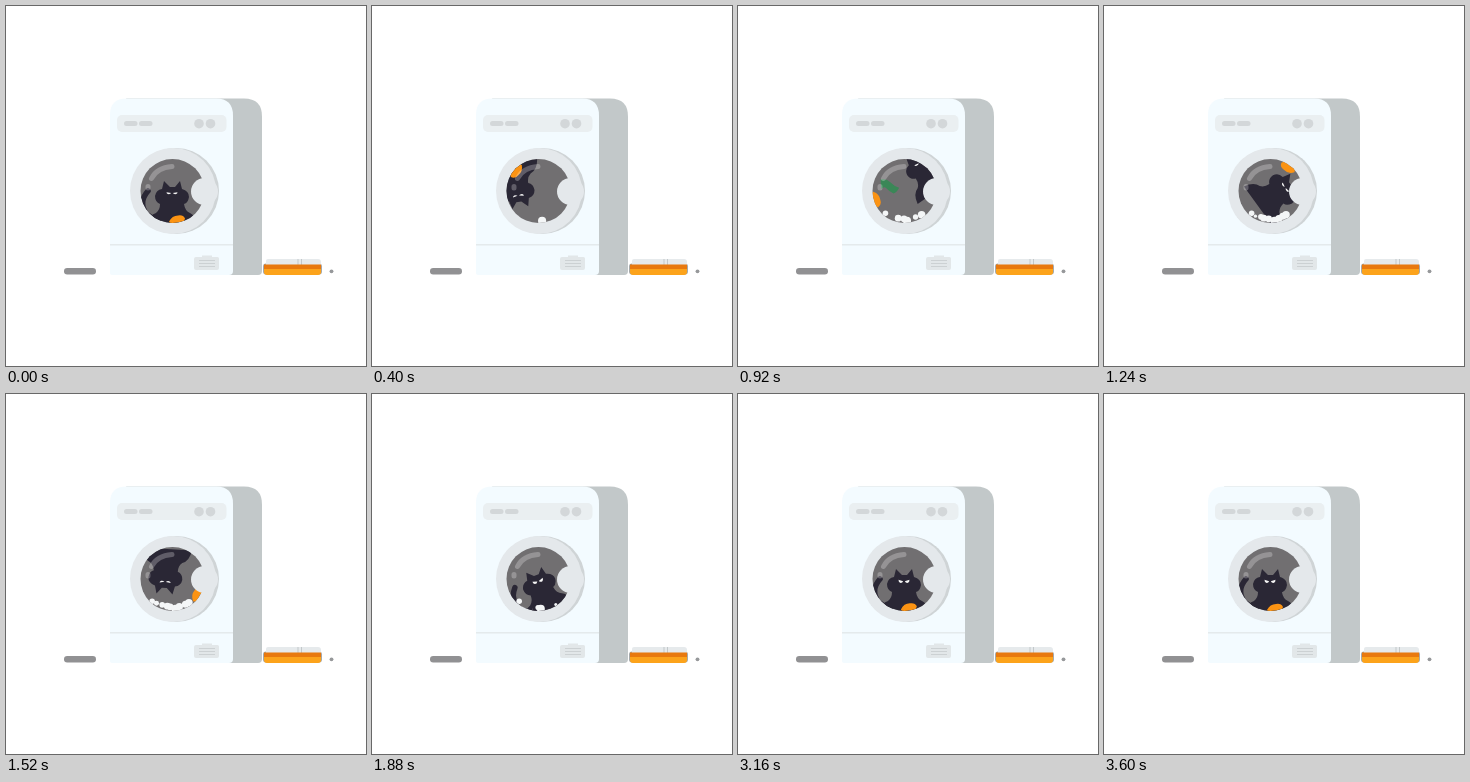
Write an HTML page that moves like this. It is 360 px wide and 360 px high and loops after 3720 ms.

```html
<!DOCTYPE html>
<html lang="en">
<head>
<meta charset="utf-8">
<title>Cat in the washer</title>
<style>
  html, body { margin: 0; width: 100%; height: 100%; overflow: hidden; background: #fff; }
  svg { display: block; width: 100vw; height: 100vh; }
</style>
</head>
<body>
<svg viewBox="0 0 360 360">
  <defs>
    <clipPath id="glass"><circle cx="166.5" cy="185" r="32"/></clipPath>
  </defs>

  <!-- floor items -->
  <rect x="58" y="262" width="32" height="6.5" rx="3.2" fill="#919193"/>
  <circle cx="325.5" cy="265.3" r="1.9" fill="#96989a"/>
  <rect x="257" y="257.5" width="59" height="11" rx="3" fill="#a5a9ab"/>
  <path d="M260 259V255q0-2 2-2H312q3 0 3 3v3z" fill="#e6eaec"/>
  <path d="M292 253v6M295.5 253v6" stroke="#c3c8ca"/>
  <path d="M258 258.5H315V264H258z" fill="#e8790f"/>
  <path d="M258 263H315V266q0 3-3 3H261q-3 0-3-3z" fill="#fca31b"/>

  <!-- cabinet -->
  <path d="M120 92.5H238q18 0 18 18V265q0 4-4 4H215z" fill="#c2c8c9"/>
  <path d="M104 109q0-16.500 16.500-16.500H210q17 0 17 17V265q0 4-4 4H106q-2 0-2-2z" fill="#f3fbff"/>
  <rect x="111" y="109" width="109.5" height="17" rx="5" fill="#eaeff1"/>
  <g fill="#d3d7d9">
    <rect x="118" y="115" width="13.5" height="5" rx="2.5"/>
    <rect x="133" y="115" width="13.5" height="5" rx="2.5"/>
    <circle cx="193" cy="117.7" r="4.8"/>
    <circle cx="204.5" cy="117.7" r="4.8"/>
  </g>
  <path d="M104 238.8H227" stroke="#e4eaec" stroke-width="1.5"/>
  <path d="M196 249.5h10v1.500h5.500q1.500 0 1.500 1.500V262q0 2-2 2H190q-2 0-2-2V253q0-2 2-2h6z" fill="#e2e7e9"/>
  <path d="M193 254.5h16M193 257.5h16M193 260.5h16" stroke="#ccd1d3"/>

  <!-- door -->
  <circle cx="170" cy="185" r="43" fill="#cfd4d6"/>
  <circle cx="167" cy="185" r="43" fill="#e4e8eb"/>
  <g clip-path="url(#glass)">
    <rect x="134" y="152" width="66" height="66" fill="#716f71"/>
    <path id="green" d="M-10-5q5-3 10 0t10 3q-1 5-4 7-5-1-8-3t-5 2z" fill="#3a8757"/>
    <g id="cat">
      <path id="tail" d="M0 0C-17-4-19-19-10-29" fill="none" stroke="#2a2735" stroke-width="5.5" stroke-linecap="round"/>
      <path d="M-10-4L-8-12-2-6H3L8-12 10-4Q17-2 17 4 16 10 12 11 13 18 18 20 24 23 25 33H-25Q-23 22-16 20-12 17-12 11-17 9-17 3-16-3-10-4z" fill="#2a2735"/>
      <g id="eyes" fill="#f5f5f5">
        <path d="M-5.500-1.300L-.8.2Q-2 2.500-4 1.800-5.500 1-5.500-1.300z"/>
        <path d="M5.500-1.300L.8.2Q2 2.500 4 1.800 5.500 1 5.500-1.300z"/>
      </g>
    </g>
    <path id="orange" d="M-8 2q3-6 9-6 5-1 7 3l-2 5q-5-2-8 0-4 2-6-2z" fill="#fb9313"/>
    <g id="suds" fill="#f4f6f7"></g>
    <path d="M145.500 172.500Q151 161.500 166 160.500M142 180.500v1.500" fill="none" stroke="#fff" stroke-opacity=".25" stroke-width="5" stroke-linecap="round"/>
  </g>
  <circle cx="198.5" cy="185.5" r="13.5" fill="#e4e8eb"/>
</svg>
<script>
const LOOP = 3720, TICK = 40, LAST = 3600;
const CX = 166, CY = 185, SUDS = 9;
const $ = id => document.getElementById(id);
const sin = deg => Math.sin(deg * Math.PI / 180);
const cos = deg => Math.cos(deg * Math.PI / 180);
const mix = (a, b, p) => a + (b - a) * p;

// 0 to 1 between two times
const ramp = (t, from, to) => Math.max(0, Math.min(1, (t - from) / (to - from)));
const ease = p => p * p * (3 - 2 * p);

function place(id, x, y, r) {
  $(id).setAttribute('transform', `translate(${x} ${y}) rotate(${r})`);
}

const sway = t => sin(t / 4);

// Two turns that linger when the cat is upright or upside down
function moveCat(t) {
  const calm = ease(ramp(t, 1520, 1860)), s = sway(t) * (1 - calm);
  const turn = .355 * t + 20 * sway(t);
  const angle = t < 2000 ? Math.min(720, turn - 14 * sin(2 * turn)) : 720;
  const toss = 28 * Math.exp(-(((t - 920) / 220) ** 2));
  place('cat', CX - 20 * s, 187 + 3 * s - toss, angle);
  const tail = 1 - ramp(t, 40, 200) + ramp(t, 1700, 1860);
  $('tail').setAttribute('transform', `translate(-14 27) scale(${tail})`);
  $('eyes').setAttribute('transform', `scale(1 ${t < 1700 ? .6 : 1})`);
}

// Round the drum and out of sight, then onto the cat's head and off again
function moveOrange(t) {
  if (t < 2200) {
    const a = .45 * t - 38 * sway(t) - 10;
    const sink = 14 * ramp(t, 1640, 1760);
    const turn = t < 1700 ? a : 721;
    place('orange', CX - 29 * sin(turn), CY + 29 * cos(turn) + sink, turn + 10);
  } else {
    const drop = ramp(t, 2240, 2480) ** 2, slide = ease(ramp(t, 2700, 3200));
    place('orange', mix(164, 171, slide), mix(140, 180, drop) + 34 * slide, mix(-35, 0, slide));
  }
}

function moveGreen(t) {
  const p = (t - 700) / 440;
  place('green', 136 + 30 * p, 165 + 64 * p * p, 60 * p - 15);
}

let seed = 7;
const random = () => (seed = seed * 16807 % 2147483647) / 2147483647;

// Bubbles lie along the bottom of the glass and appear in a mixed order
const bubbles = Array.from({ length: SUDS }, (_, i) => {
  const x = 147 + (5 + 4 * i) % SUDS * 4.5;
  const dot = document.createElementNS('http://www.w3.org/2000/svg', 'circle');
  $('suds').appendChild(dot);
  return {
    dot, x,
    y: CY + Math.sqrt(900 - (x - CX) ** 2) - 3 * random(),
    r: 2.4 + 1.8 * random(),
    start: 280 + 110 * i,
    end: 2050 - 40 * i
  };
});

function moveSuds(t) {
  bubbles.forEach(({ dot, x, y, r, start, end }, i) => {
    const grow = ramp(t, start, start + 120) * (1 - ramp(t, end - 120, end));
    dot.setAttribute('cx', x + Math.sin(t / 160 + i));
    dot.setAttribute('cy', y + 3 * (1 - grow));
    dot.setAttribute('r', r * grow);
  });
}

const begin = performance.now();
function frame() {
  const now = (performance.now() - begin) % LOOP;
  const t = Math.min(LAST, Math.floor(now / TICK) * TICK);
  for (const move of [moveCat, moveOrange, moveGreen, moveSuds]) move(t);
  requestAnimationFrame(frame);
}
frame();
</script>
</body>
</html>
```
